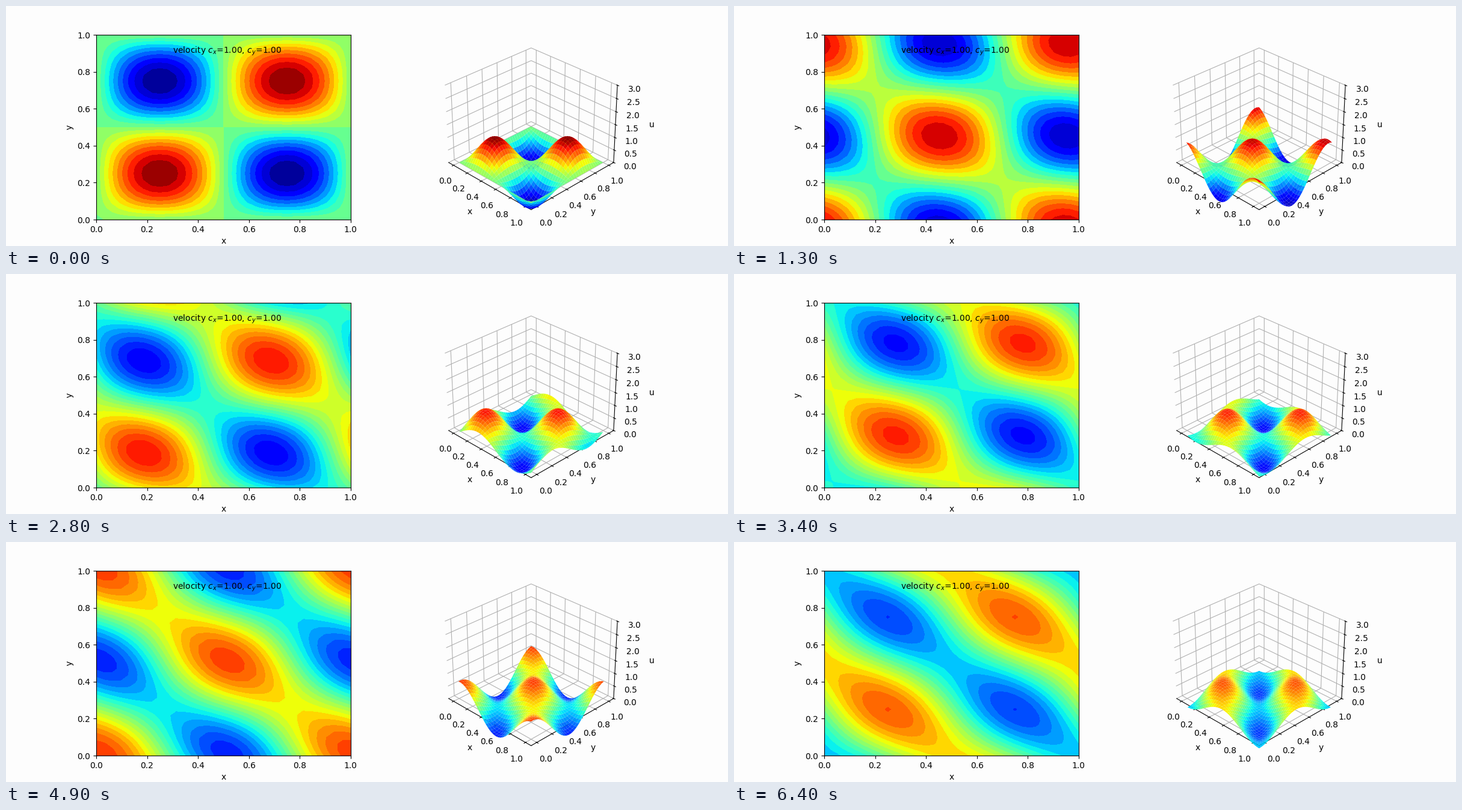
Animation of 1200x400 px, one loop 6.5 s. Source, as a matplotlib script:

```python
import numpy as np
import matplotlib.pyplot as plt
from matplotlib.animation import FuncAnimation

CELLS = 32          # grid cells per side
STEPS = 64          # time steps for one full crossing
CX = CY = 1.0
PAPER = "#fdfdfd"
COLORS = dict(cmap="jet", vmin=-1, vmax=1)

x = np.linspace(0, 1, CELLS + 1)
X, Y = np.meshgrid(x, x)


def solve():
    """Upwind advection of a sine field on a periodic square."""
    u = np.sin(2 * np.pi * X) * np.sin(2 * np.pi * Y)
    fields = [u]
    nx, ny = CX * CELLS / STEPS, CY * CELLS / STEPS
    for _ in range(STEPS):
        c = u[:-1, :-1]
        c = (c - nx * (c - np.roll(c, 1, axis=1))
               - ny * (c - np.roll(c, 1, axis=0)))
        u = np.pad(c, (0, 1), mode="wrap")
        fields.append(u)
    return fields


fields = solve()

fig = plt.figure(figsize=(12, 4), dpi=100, facecolor=PAPER)

flat = fig.add_subplot(1, 2, 1)
flat.set(xlim=(0, 1), ylim=(0, 1), xlabel="x", ylabel="y")
flat.text(0.3, 0.9, f"velocity $c_x$={CX:.2f}, $c_y$={CY:.2f}")

solid = fig.add_subplot(1, 2, 2, projection="3d", facecolor=PAPER)
solid.view_init(elev=30, azim=-45)
for axis in (solid.xaxis, solid.yaxis, solid.zaxis):
    axis.set_pane_color(PAPER)

# 5% data margin plus the usual 1/48 view margin
pad = 0.05 + 1.1 / 48
shown = []


def draw(n):
    while shown:
        shown.pop().remove()
    u = fields[n]
    shown.append(flat.contourf(X, Y, u, 20, **COLORS))
    shown.append(solid.plot_surface(X, Y, u, **COLORS))
    flat.set(xlim=(0, 1), ylim=(0, 1))
    solid.set(xlim=(-pad, 1 + pad), ylim=(-pad, 1 + pad), zlim=(0, 3),
              xticks=np.linspace(0, 1, 6), yticks=np.linspace(0, 1, 6),
              zticks=np.linspace(0, 3, 7),
              xlabel="x", ylabel="y", zlabel="u")
    return shown


anim = FuncAnimation(fig, draw, frames=len(fields), init_func=lambda: draw(0),
                     interval=100, repeat=True, repeat_delay=0, blit=False)
plt.show()
```
